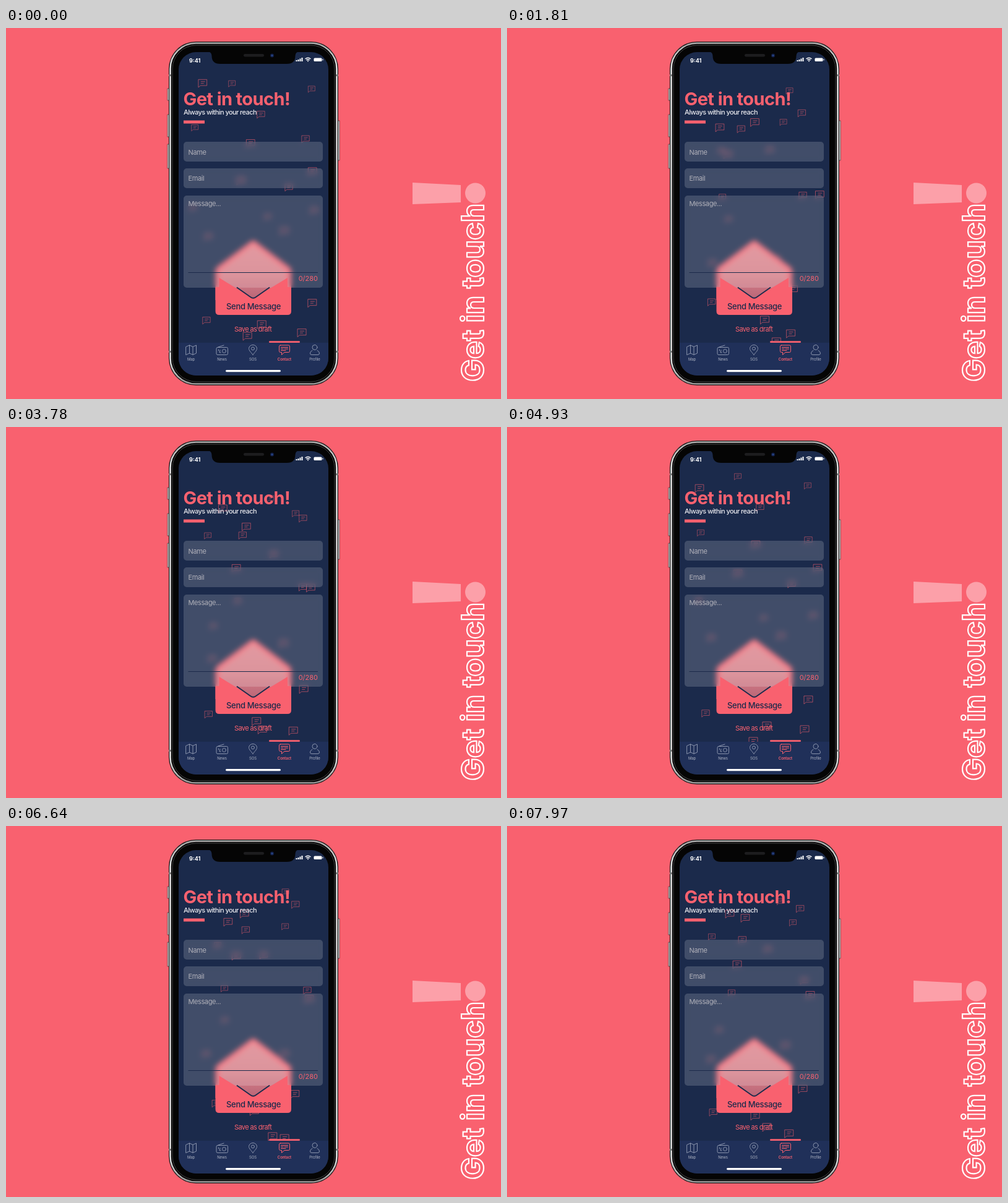
An HTML page for the animation above (8 s loop, 800 by 600 pixels).

```html
<!DOCTYPE html>
<html lang="en">
<head>
<meta charset="utf-8">
<title>Get in touch</title>
<style>
  html, body { margin: 0; width: 100%; height: 100%; overflow: hidden; background: #f9616f; }
  #stage { position: absolute; left: 0; top: 0; width: 800px; height: 600px; overflow: hidden; }
  svg { position: absolute; left: 0; top: 0; font-family: Inter, "Noto Sans", sans-serif; }
  .field {
    position: absolute; left: 287px; width: 225px; border-radius: 5px;
    background: rgba(255, 255, 255, .168); backdrop-filter: blur(4px);
  }
  .label { font-size: 11px; letter-spacing: -.4px; fill: #b0b0b9; }
  .tab { font-size: 6px; letter-spacing: -.1px; text-anchor: middle; fill: #aeb4c3; }
  .icon { fill: none; stroke: #8993ac; stroke-width: 1; stroke-linejoin: round; stroke-linecap: round; }
  .active { stroke: #f9616f; }
  .pink { fill: #f9616f; }
</style>
</head>
<body>
<div id="stage">
  <svg width="800" height="600">
    <defs>
      <linearGradient id="metal" x2="0" y2="1">
        <stop offset="0" stop-color="#aaa"/><stop offset=".08" stop-color="#eee"/>
        <stop offset=".5" stop-color="#d8d8d8"/><stop offset=".92" stop-color="#eee"/>
        <stop offset="1" stop-color="#999"/>
      </linearGradient>
      <linearGradient id="lining" x2="0" y2="1">
        <stop offset="0" stop-color="#dc858e"/><stop offset=".55" stop-color="#d67f89"/>
        <stop offset="1" stop-color="#b96576"/>
      </linearGradient>
      <clipPath id="floatArea"><rect x="279" y="69" width="242" height="440"/></clipPath>
      <path id="bubble" d="M-7-6H7V4H-3.500L-7 7ZM-3-2.500H4M-3 .5H2"/>
    </defs>

    <!-- side lettering -->
    <g fill="#fff" fill-opacity=".4">
      <path d="M657 250L735 254V282L657 285Z"/>
      <circle cx="758.5" cy="267" r="16.5"/>
    </g>
    <text transform="translate(772 572) rotate(-90)" font-size="49" font-weight="700"
          fill="none" stroke="#fff" stroke-width="2.2">Get in touch</text>

    <!-- phone -->
    <g fill="#c9c9c9" stroke="#222" stroke-width=".6">
      <rect x="261" y="98" width="3" height="19"/>
      <rect x="261" y="140" width="3" height="36"/>
      <rect x="261" y="188" width="3" height="39"/>
      <rect x="536" y="150" width="3" height="64"/>
    </g>
    <rect x="263" y="22" width="274" height="556" rx="44" fill="#1c1c1c"/>
    <rect x="265.5" y="24.5" width="269" height="551" rx="41.5" fill="#050505" stroke="url(#metal)" stroke-width="2.4"/>
    <rect x="269" y="28" width="262" height="544" rx="38" fill="#050505" stroke="#555" stroke-width=".8"/>
    <path d="M263 76.5h4M533 76.5h4M263 523.5h4M533 523.5h4" stroke="#777" stroke-width="3"/>
    <rect x="279" y="39" width="242" height="523" rx="28" fill="#1b2a4b"/>
    <path d="M279 509H521V534A28 28 0 0 1 493 562H307A28 28 0 0 1 279 534Z" fill="#203059"/>
    <path d="M326 38H474Q467.5 39 467.5 45Q467.5 58 454 58H346Q332.5 58 332.5 45Q332.5 39 326 38Z" fill="#050505"/>
    <rect x="384" y="42" width="33" height="4.5" rx="2.2" fill="#1d1d1f"/>
    <circle cx="430" cy="44.5" r="3" fill="#14214a"/><circle cx="430" cy="44.5" r="1.3" fill="#2c4d93"/>

    <g id="bubbles" clip-path="url(#floatArea)" fill="none" stroke="#f9616f" stroke-opacity=".6"></g>

    <!-- envelope back -->
    <path d="M338.5 392Q338.5 389 342 386L396 345Q399.5 342.5 403 345L457 386Q461 389 461 392V440H338.5Z" class="pink"/>
    <path d="M345 392L399.5 350L454 392V440H345Z" fill="url(#lining)"/>
  </svg>

  <div class="field" style="top:184px;height:31.5px"></div>
  <div class="field" style="top:227px;height:32px"></div>
  <div class="field" style="top:271px;height:148.5px"></div>

  <svg width="800" height="600">
    <!-- envelope front -->
    <path d="M344.5 404L396 435.5Q399.5 438 403 435.5L455 404V419H461V458Q461 464 455 464H344.5Q338.5 464 338.5 458V419H344.5Z" class="pink"/>
    <path d="M373 419.5L395 435Q399.5 438.5 404 435L426 419.5" fill="none" stroke="#1b2a4b" stroke-width="1.8"/>
    <path d="M294.5 395.5H504" stroke="#1b2a4b"/>
    <text x="356" y="455" font-size="13" font-weight="500" letter-spacing="-.32" fill="#1b2a4b">Send Message</text>

    <text x="286.5" y="124.5" font-size="29" font-weight="700" letter-spacing="-.6" class="pink">Get in touch!</text>
    <text x="287" y="139.5" font-size="11" font-weight="500" letter-spacing="-.58" fill="#e9e9ee">Always within your reach</text>
    <rect x="287" y="149.5" width="34" height="5" class="pink"/>
    <text x="294.5" y="204.5" class="label">Name</text>
    <text x="294.5" y="247" class="label">Email</text>
    <text x="294.5" y="288" class="label">Message...</text>
    <text x="504" y="409" font-size="11" text-anchor="end" class="pink">0/280</text>
    <text x="369" y="491" font-size="11" letter-spacing="-.6" class="pink">Save as draft</text>

    <!-- status bar -->
    <text x="296" y="56" font-size="9" font-weight="700" fill="#fff">9:41</text>
    <path d="M469.5 54V52M472.5 54V51M475.5 54V49.5M478.5 54V48" stroke="#fff" stroke-width="2"/>
    <g fill="none" stroke="#fff" stroke-width="1.3">
      <path d="M483.5 50Q488 46.5 492.5 50M485.3 52Q488 50 490.7 52"/>
      <circle cx="488" cy="53.5" r=".4"/>
    </g>
    <rect x="497.5" y="48.5" width="13" height="5.5" rx="1.5" fill="#fff"/>
    <path d="M512 50V52.5" stroke="#fff"/>

    <!-- tab bar -->
    <rect x="425" y="506.3" width="50" height="2.7" rx="1.3" class="pink"/>
    <g class="icon">
      <path d="M291 515.5L296.5 513L302 515.5L307.5 513V526L302 528.5L296.5 526L291 528.5ZM296.5 513V526M302 515.5V528.5"/>
      <rect x="340" y="516.5" width="18.5" height="12" rx="2"/>
      <path d="M343 516L352 513M343.5 520V522M346 521L345 525H347"/>
      <circle cx="352.5" cy="522.5" r="3"/>
      <path d="M399 528.5C396 524.5 392.5 521.5 392.5 518.5A6.5 6 0 0 1 405.5 518.5C405.5 521.5 402 524.5 399 528.5Z"/>
      <circle cx="399" cy="518.5" r="2.5"/>
      <g class="active">
        <path d="M443.5 513H456.5Q458.5 513 458.5 515V522.5Q458.5 524.5 456.5 524.5H450L445.5 528.5V524.5H443.5Q441.5 524.5 441.5 522.5V515Q441.5 513 443.5 513Z"/>
        <path d="M444.5 516.5H455.5M444.5 519H448M450 519H455.5M444.5 521.5H452"/>
      </g>
      <circle cx="499" cy="516.5" r="4"/>
      <path d="M495 521.5Q491.5 523 491.5 526Q491.5 528.5 494 528.5H504Q506.5 528.5 506.5 526Q506.5 523 503 521.5"/>
    </g>
    <g class="tab">
      <text x="299" y="538">Map</text>
      <text x="349" y="538">News</text>
      <text x="399" y="538">SOS</text>
      <text x="450" y="538" class="pink" font-weight="600">Contact</text>
      <text x="499" y="538">Profile</text>
    </g>
    <rect x="355" y="553" width="89" height="3.2" rx="1.6" fill="#fff"/>
  </svg>
</div>

<script>
const LOOP = 8000, CALM = 2910, WIDE = 4930;

// Each bubble: its place in the gathered swarm, then how far it spreads.
const swarm = [
  [450,112, -77,-32], [474,134, 13,49], [352,152, -41,-53], [454,156, 32,-61],
  [380,174, 29,-44], [393,149, 9,41], [339,189, -26,-18], [422,199, 38,55],
  [364,214, 9,23], [355,270, 60,39], [480,260, 15,45], [498,273, 4,-45],
  [351,320, -41,-39], [330,378, 0,-37], [442,365, 1,-27], [470,425, 17,16],
  [333,453, -12,10], [409,469, 11,14], [428,497, -30,11], [456,497, 25,-8]
];

const layer = document.getElementById('bubbles');
const bubbles = swarm.map(() => {
  const node = document.createElementNS('http://www.w3.org/2000/svg', 'use');
  node.setAttribute('href', '#bubble');
  return layer.appendChild(node);
});

const pulse = (t, peak) => Math.exp(-(((t - peak) / 900) ** 2));

function draw() {
  const t = performance.now() % LOOP;
  const spread = pulse(t, 0) + pulse(t, WIDE);
  const phase = Math.PI * (t - CALM) / (WIDE - CALM);
  swarm.forEach(([x, y, dx, dy], i) => {
    const sign = i % 2 ? 1 : -1;
    const px = x + dx * spread + 8 * sign * Math.sin(phase * (1 + i % 3));
    const py = y + dy * spread + 10 * Math.sin(phase * (1 + i % 2)) * (i % 4 < 2 ? 1 : -1);
    const scale = y > 400 && x > 350 ? 1 : .78 + .1 * (i % 3);
    bubbles[i].setAttribute('transform', `translate(${px} ${py}) scale(${scale})`);
  });
  requestAnimationFrame(draw);
}
draw();
</script>
</body>
</html>
```
